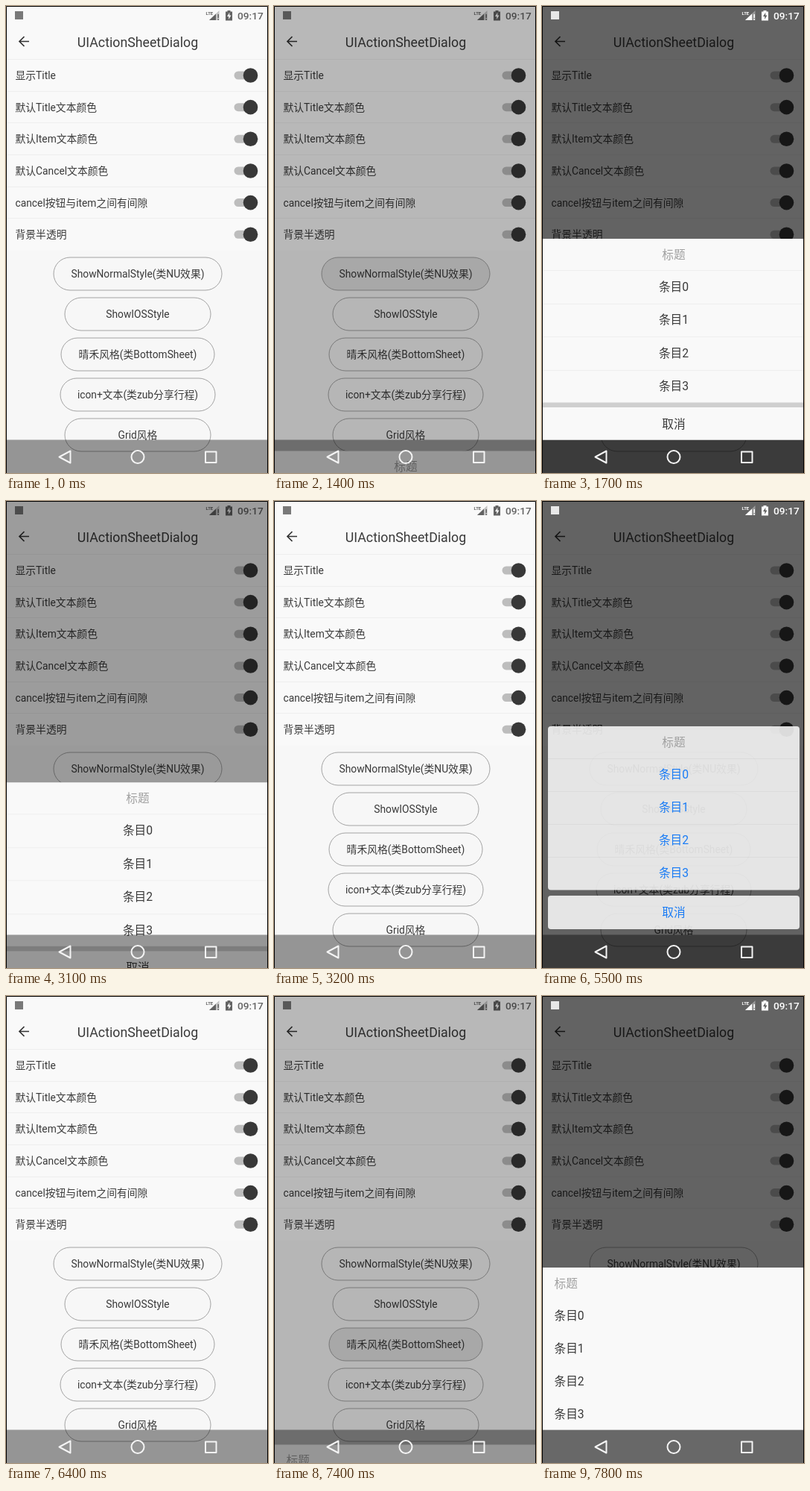
Recreate the animation shown at these times as an HTML page. Size 352 px wide and 626 px high, loop 8000 ms.

```html
<!DOCTYPE html>
<html lang="zh-CN">
<head>
<meta charset="utf-8">
<title>UIActionSheetDialog</title>
<style>
html, body { margin: 0; width: 100%; height: 100%; overflow: hidden; background: #000; }
svg { display: block; width: 100vw; height: 100vh; }
text { font: 13.8px Roboto, "Noto Sans CJK SC", "Noto Sans CJK", sans-serif; fill: #3a3a3a; }
.mid { text-anchor: middle; }
.item { font-size: 15.7px; }
.hint { fill: #a0a0a0; }
.blue { fill: #1a7cf5; }
.line { stroke: #000; stroke-opacity: .045; }
.pill { fill: #000; fill-opacity: 0; stroke: #999; stroke-width: .9; }
.nav { fill: none; stroke: #f4f4f4; stroke-width: 2; stroke-linejoin: round; }
#status text { fill: inherit; }
</style>
</head>
<body>
<svg viewBox="0 0 352 626" preserveAspectRatio="none">
  <rect width="352" height="626" fill="#f7f7f7"/>
  <rect width="352" height="328" fill="#f9f9f9"/>
  <path d="M31 47.5H18M24.5 41L18 47.5L24.5 54" fill="none" stroke="#333" stroke-width="1.7"/>
  <text class="mid" x="177" y="54.5" style="font-size:17.75px">UIActionSheetDialog</text>
  <g id="rows"></g>
  <g id="buttons"></g>
  <rect id="dim" width="352" height="626" opacity="0"/>
  <g id="sheets"></g>
  <rect y="581.5" width="352" height="44.5" opacity=".4"/>
  <path class="nav" d="M71.5 604.5L86.5 596.5V612.5Z"/>
  <circle class="nav" cx="177" cy="604.5" r="8.5"/>
  <rect class="nav" x="268" y="597.5" width="14.5" height="14.5"/>
  <g id="status">
    <rect x="12" y="7" width="11" height="11" opacity=".85"/>
    <text x="268.5" y="11.5" style="font-size:6px;font-weight:700">LTE</text>
    <path d="M273 19L286.5 6V19Z" opacity=".35"/>
    <path d="M273 19L282 10.5V19Z"/>
    <path d="M284.5 11h1.5v5h-1.5zM284.5 17.3h1.5v1.7h-1.5z"/>
    <path fill-rule="evenodd" d="M295 7.5h2.500v-1.500h4v1.500h2.500v12h-9zM300.300 8.800l-3.300 5.200h2.200v4l3.300-5.500h-2.200z"/>
    <text x="311" y="17.5" style="font-size:13.7px;font-weight:500">09:17</text>
  </g>
  <path d="M.5 626V.5H351.5V626" fill="none" stroke="#000"/>
</svg>
<script>
const $ = id => document.getElementById(id);
const label = (x, y, s, cls = '') => `<text class="${cls}" x="${x}" y="${y}" dy=".36em">${s}</text>`;
const rule = (y, x = 0) => `<path class="line" d="M${x} ${y}H${352 - x}"/>`;
const box = (x, y, w, h, fill, more = '') =>
  `<rect x="${x}" y="${y}" width="${w}" height="${h}" fill="${fill}" ${more}/>`;

$('rows').innerHTML = ['显示Title', '默认Title文本颜色', '默认Item文本颜色',
  '默认Cancel文本颜色', 'cancel按钮与item之间有间隙', '背景半透明'].map((s, i) => {
  const y = 93 + i * 42.65;
  return rule(Math.round(y - 22) + .5) + label(12.5, y, s) +
    box(306.5, y - 5.5, 28, 11, '#bdbdbd', 'rx="5.5"') +
    `<circle cx="328.5" cy="${y}" r="9.8" fill="#383838"/>`;
}).join('');

$('buttons').innerHTML = [
  ['ShowNormalStyle(类NU效果)', 226], ['ShowIOSStyle', 196], ['晴禾风格(类BottomSheet)', 206],
  ['icon+文本(类zub分享行程)', 208], ['Grid风格', 196]
].map(([s, w], i) => {
  const y = 337 + i * 54;
  return `<g><rect class="pill" x="${177 - w / 2}" y="${y}" width="${w}" height="44" rx="22"/>` +
    label(177, y + 22, s, 'mid') + '</g>';
}).join('');

// Title row followed by four evenly spaced items
function list(x, y, gap, cls, inset) {
  let out = label(x, y, '标题', cls + ' item hint');
  for (let i = 0; i < 4; i++) {
    const mid = y + 43 + i * gap;
    if (inset !== undefined) out += rule(Math.round(mid - 22) + .5, inset);
    out += label(x, mid, '条目' + i, cls + ' item' + (inset ? ' blue' : ''));
  }
  return out;
}

const white = '#f9f9f9', glass = 'fill-opacity=".87" rx="4"';
const sheets = [
  { top: 312, art: box(0, 312, 352, 270, '#cfcfcf') + box(0, 312, 352, 219.5, white) +
      box(0, 538, 352, 44, white) + list(177, 333, 44.5, 'mid', 0) + label(177, 560, '取消', 'mid item') },
  { top: 302, art: box(8, 302, 338, 219.5, white, glass) + box(8, 529, 338, 45, white, glass) +
      list(177, 323.5, 44, 'mid', 8) + label(177, 551.5, '取消', 'mid item blue') },
  { top: 364, art: box(0, 364, 352, 218, white) + box(0, 582, 352, 44, '#adadad') +
      list(16.5, 385, 44, '') }
];
$('sheets').innerHTML = sheets.map(s => `<g>${s.art}</g>`).join('');

const LOOP = 8000, TICK = 100;
const cues = [{ tap: 1200, leave: 3040 }, { tap: 5000, leave: 6160 }, { tap: 7200, leave: LOOP }];
const part = (t, from, span) => Math.min(1, Math.max(0, (t - from) / span));
const easeOut = (p, n) => 1 - (1 - p) ** n;

const groups = [...$('sheets').children];
const buttons = [...$('buttons').children];
const start = performance.now();

function draw() {
  const now = Math.max(0, performance.now() - start) % LOOP;
  const t = Math.floor(now / TICK) * TICK;
  let dim = 0, light = false;

  cues.forEach(({ tap, leave }, i) => {
    const fade = easeOut(part(t, tap + 100, 400), 2);
    const slide = easeOut(part(t, tap + 190, 310), 3);
    const exit = part(t, leave, 160);
    const shift = (626 - sheets[i].top) * (1 - slide + exit ** 1.6);
    const touched = t >= tap && t < tap + TICK;
    const pressed = t >= tap + TICK;

    dim += .6 * fade * (1 - exit);
    light ||= slide > .9 && exit === 0;
    groups[i].setAttribute('transform', `translate(0 ${shift})`);
    groups[i].style.display = slide > 0 && exit < 1 ? '' : 'none';
    buttons[i].firstChild.style.fillOpacity = pressed ? .09 * (1 - slide) : 0;
    buttons[i].lastChild.style.opacity = touched ? .75 : 1;
  });

  $('dim').setAttribute('opacity', dim);
  $('status').setAttribute('fill', light ? '#fff' : '#000');
  $('status').setAttribute('opacity', light ? 1 : .6);
  requestAnimationFrame(draw);
}
draw();
</script>
</body>
</html>
```
